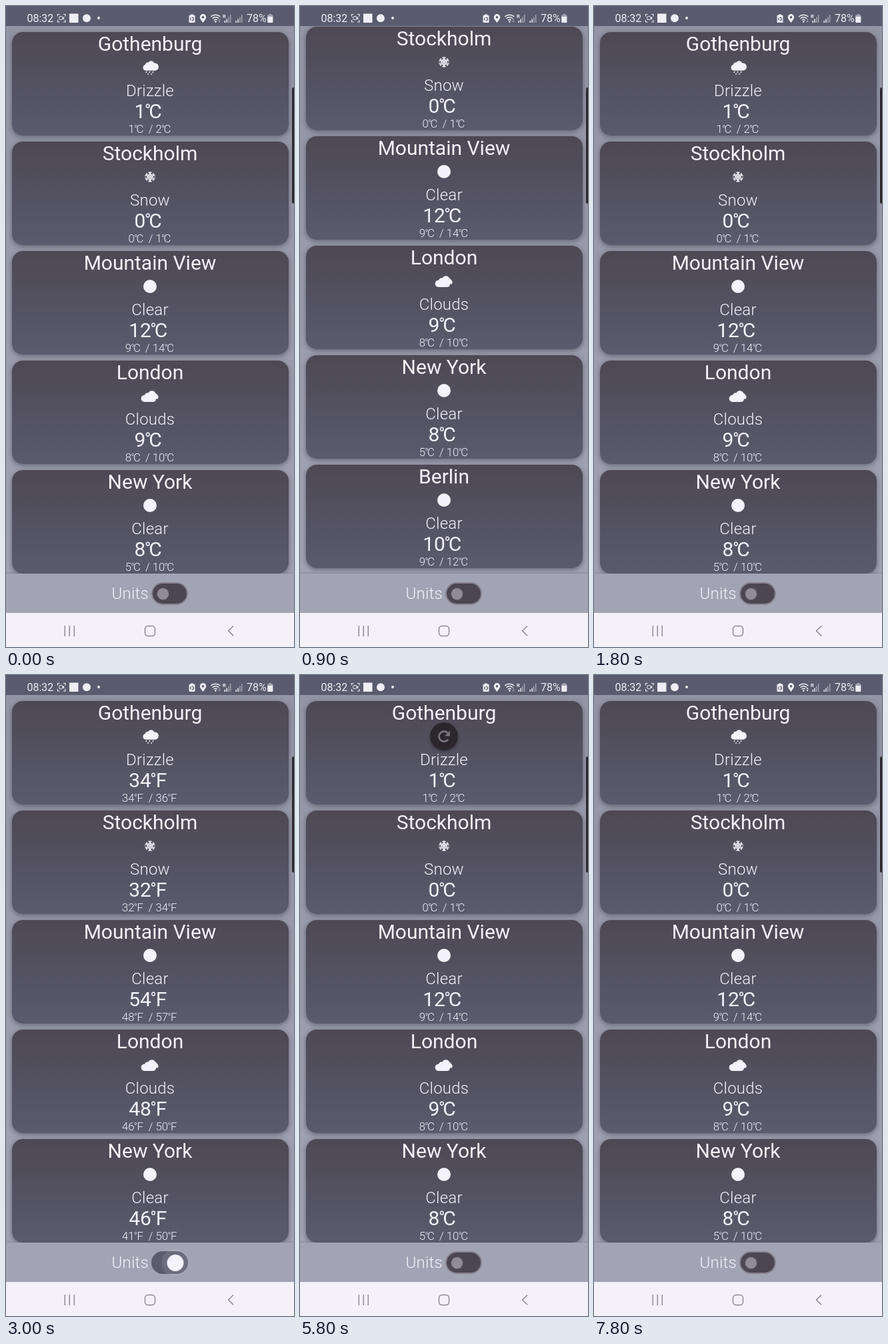
Write an HTML page that moves like this. It is 432 px wide and 960 px high and loops after 8300 ms.

```html
<!DOCTYPE html>
<html lang="en">
<head>
<meta charset="utf-8">
<title>Weather list</title>
<style>
  html, body { margin: 0; width: 100%; height: 100%; overflow: hidden; }
  body { font-family: Roboto, sans-serif; color: #f4f2fa; }
  #stage { position: relative; width: 432px; height: 960px; overflow: hidden; background: #5a5b6e; }
  #stage > * { position: absolute; }
  .view {
    left: 0; top: 30px; width: 432px; height: 820px; overflow: hidden;
    background: linear-gradient(#9395a4, #a1a3b2);
  }
  .stretch { height: 100%; }
  .list { padding-top: 8.5px; }
  .card {
    position: relative; display: grid; box-sizing: border-box;
    grid-template-rows: 35px 37px 32px 29px 25px;
    align-items: center; justify-items: center;
    width: 415px; height: 155.5px; margin: 0 auto 8.5px; border-radius: 16px;
    background: linear-gradient(#4d4854, #5a5b6d);
    box-shadow: 0 2px 7px rgba(45, 42, 58, .5);
    white-space: nowrap;
  }
  .card > * { grid-column: 1; }
  .city, .temp { font-size: 30px; }
  .label, .units { font-size: 24px; font-weight: 300; letter-spacing: .2px; }
  .temp { grid-row: 4; }
  .range { grid-row: 5; font-size: 16.8px; font-weight: 300; padding-left: 2px; }
  .f { opacity: 0; }
  .deg { position: relative; top: -.1em; font-size: .85em; margin: 0 -.124em 0 -.06em; }
  .f .deg { margin-right: -.048em; }
  .unit { margin-right: .186em; }
  .f .unit { margin-right: .22em; }
  .icon { width: 32px; height: 32px; fill: #f4f2fa; }

  .pull {
    position: absolute; left: 195px; top: 41px; width: 42px; height: 42px;
    border-radius: 50%; background: #2b272d; opacity: 0;
    box-shadow: 0 2px 4px rgba(30, 28, 36, .4);
  }
  .pull svg { position: absolute; inset: 0; fill: none; stroke: #7c7782; stroke-width: 2.6; }

  .bar {
    left: 0; top: 850px; width: 432px; height: 59px; background: #a2a4b3;
    box-shadow: 0 0 3px rgba(70, 68, 84, .45);
  }
  .units { position: absolute; left: 158.5px; top: 14px; line-height: 32px; }
  .track {
    position: absolute; left: 218px; top: 13px; width: 55px; height: 34px; box-sizing: border-box;
    border: 2px solid #87838f; border-radius: 17px; background: #4b4652;
  }
  .halo, .thumb { position: absolute; border-radius: 50%; }
  .halo { left: 215px; top: 10px; width: 40px; height: 40px; background: rgba(235, 230, 245, .12); opacity: 0; }
  .thumb { left: 222.5px; top: 17.5px; width: 25px; height: 25px; background: #918c98; transform: scale(.7); }
  .nav { left: 0; top: 909px; width: 432px; height: 51px; background: #f4f2f8; }
  .edge { right: 0; top: 122px; width: 3px; height: 174px; border-radius: 3px 0 0 3px; background: #2b272d; }
  .chrome { left: 0; top: 0; fill: #efedf5; font-size: 16px; }
</style>
</head>
<body>
<svg width="0" height="0" style="position:absolute">
  <symbol id="clear" viewBox="-16 -16 32 32"><circle r="10"/></symbol>
  <symbol id="clouds" viewBox="-16 -16 32 32">
    <path d="M-8.5 9A5 5 0 0 1-8-1.2A4.5 4.5 0 0 1-2.5-4.5A6 6 0 0 1 8.2-4.2A5 5 0 0 1 11-1.5A4 4 0 0 1 11.5 4.5H9A5 5 0 0 1 4 9Z"/>
  </symbol>
  <symbol id="drizzle" viewBox="-16 -16 32 32">
    <path d="M-6.5 4.8A4.6 4.6 0 0 1-7-4.2A4.2 4.2 0 0 1-2.5-7.5A5.2 5.2 0 0 1 6.5-6.5A4.8 4.8 0 0 1 8 4.8Z"/>
    <path d="M-5 6l-1 2M0 6l-1 2M5 6l-1 2M-2.5 9l-.8 1.8M2.5 9l-.8 1.8" stroke="#f4f2fa" stroke-width="1.5"/>
  </symbol>
  <symbol id="snow" viewBox="-16 -16 32 32">
    <g id="arm" fill="none" stroke="#f4f2fa" stroke-width="1.3">
      <path id="spoke" d="M0 0V-8M-2.6-7.4L0-4.8L2.6-7.4M-2-4.2L0-2.4L2-4.2"/>
      <use href="#spoke" transform="rotate(60)"/>
      <use href="#spoke" transform="rotate(120)"/>
      <use href="#spoke" transform="rotate(180)"/>
      <use href="#spoke" transform="rotate(240)"/>
      <use href="#spoke" transform="rotate(300)"/>
    </g>
  </symbol>
</svg>

<div id="stage">
  <div class="view">
    <div class="stretch"><div class="list"></div></div>
    <div class="pull">
      <svg class="arrow" viewBox="-21 -21 42 42">
        <path d="M6.2 4.5A7.6 7.6 0 1 1 5.6-5.2"/>
        <path d="M8.8-8.5V-.6H1Z" fill="#7c7782" stroke="none"/>
      </svg>
      <svg class="spin" viewBox="-21 -21 42 42"><path d="M0-7.6A7.6 7.6 0 1 1-7.6 0"/></svg>
    </div>
  </div>

  <div class="bar">
    <span class="units">Units</span>
    <div class="track"></div>
    <div class="halo"></div>
    <div class="thumb"></div>
  </div>
  <div class="nav"></div>
  <div class="edge"></div>

  <svg class="chrome" width="432" height="960">
    <text x="31.5" y="23.7">08:32</text>
    <path d="M77.5 15.5v-3h3M86 12.5h3v3M89 21v3h-3M80.500 24h-3v-3" fill="none" stroke="#efedf5" stroke-width="1.2"/>
    <g class="rec">
      <rect x="79.800" y="15.600" width="5" height="5" rx="1" fill="none" stroke="#efedf5"/>
      <path d="M85 17.500l2.200-1.500v4.500L85 19Z"/>
    </g>
    <rect x="95" y="11.500" width="13.500" height="13.500"/>
    <circle cx="121" cy="18.200" r="6"/>
    <circle cx="139" cy="18" r="2"/>

    <path d="M277 12.500h4v1.200h1.500a1 1 0 0 1 1 1V24a1 1 0 0 1-1 1h-7a1 1 0 0 1-1-1v-9.300a1 1 0 0 1 1-1H277Z"/>
    <circle cx="279" cy="19.500" r="2.300" fill="none" stroke="#5a5b6e" stroke-width="1.200" stroke-dasharray="3.600 1.200"/>
    <path fill-rule="evenodd" d="M295.500 25C292 20.500 290.800 18.500 290.800 16.700a4.700 4.700 0 0 1 9.400 0C300.200 18.500 299 20.500 295.500 25ZM295.500 15a1.800 1.800 0 1 0 .01 0Z"/>
    <g fill="none" stroke="#efedf5" stroke-width="1.400">
      <path d="M307.200 16a10.500 10.500 0 0 1 14.200 0M309.500 18.700a7 7 0 0 1 9.600 0M311.800 21.300a3.800 3.800 0 0 1 5 0"/>
    </g>
    <circle cx="314.300" cy="23.500" r="1.300"/>
    <path class="up" d="M318.500 21l1.600-2.600 1.600 2.600Z"/>
    <path class="down" d="M318.500 22.300h3.200l-1.600 2.500Z"/>
    <text x="325" y="18" font-size="7.500" font-weight="700">R</text>
    <g id="signal">
      <path d="M327.500 22h1.500v3h-1.500zM330.300 19.500h1.500V25h-1.500z"/>
      <path d="M333.100 16.500h1.500V25h-1.500zM335.900 13h1.500v12h-1.500z" opacity=".5"/>
    </g>
    <use href="#signal" x="17"/>
    <text x="361" y="23.700">78%</text>
    <path d="M394.500 12h3.600v1.300h1.300a1 1 0 0 1 1 1V16h-8.200v-1.700a1 1 0 0 1 1-1h1.300Z" opacity=".5"/>
    <path d="M392.200 16h8.200v8a1 1 0 0 1-1 1h-6.200a1 1 0 0 1-1-1Z"/>

    <g fill="none" stroke="#8d8a97" stroke-width="1.500">
      <path d="M88.300 928v16M95.300 928v16M102.300 928v16M341 928.500l-7.500 7.300 7.500 7.300"/>
      <rect x="208.500" y="928.500" width="15" height="15" rx="4.500"/>
    </g>
  </svg>
</div>

<script>
  const LOOP = 8300;
  const cities = [
    ['Gothenburg', 'Drizzle', 1, 1, 2],
    ['Stockholm', 'Snow', 0, 0, 1],
    ['Mountain View', 'Clear', 12, 9, 14],
    ['London', 'Clouds', 9, 8, 10],
    ['New York', 'Clear', 8, 5, 10],
    ['Berlin', 'Clear', 10, 9, 12]
  ];

  const degrees = (c, unit) => {
    const value = unit === 'F' ? Math.round(c * 1.8 + 32) : c;
    return `${value}<span class="deg">°</span><span class="unit">${unit}</span>`;
  };
  const readings = (unit, now, low, high) => `
    <div class="temp ${unit.toLowerCase()}">${degrees(now, unit)}</div>
    <div class="range ${unit.toLowerCase()}">${degrees(low, unit)} / ${degrees(high, unit)}</div>`;

  document.querySelector('.list').innerHTML = cities.map(([city, sky, ...temps]) => `
    <div class="card">
      <div class="city">${city}</div>
      <svg class="icon"><use href="#${sky.toLowerCase()}"/></svg>
      <div class="label">${sky}</div>
      ${readings('C', ...temps)}${readings('F', ...temps)}
    </div>`).join('');

  // Stepped loop: each [ms, value] holds until the next one.
  function play(selector, steps, style) {
    const frames = steps.map(([ms, ...v]) => ({
      offset: Math.max(0, ms - 4) / LOOP, easing: 'step-end', ...style(...v)
    }));
    for (const el of document.querySelectorAll(selector))
      el.animate(frames, { duration: LOOP, iterations: Infinity });
  }
  const opacity = v => ({ opacity: v });
  const rotate = a => ({ transform: `rotate(${a}deg)` });

  play('.list', [[0, 0], [500, 85], [600, 172], [1600, 167.5], [1700, 80], [1800, 0]],
    y => ({ transform: `translateY(${-y}px)` }));

  // Overscroll at either end
  play('.stretch', [
    [0, 0, 100], [700, .012, 100], [800, .005, 100], [900, 0, 100],
    [1900, .006, 0], [2000, .012, 0], [2100, .012, 0], [2200, .008, 0], [2300, .003, 0], [2400, 0, 0]
  ], (k, origin) => ({ transform: `scaleY(${1 + k})`, transformOrigin: `0 ${origin}%` }));

  const blink = [[0, 1]];
  for (let ms = 300, on = 0; ms < LOOP; ms += 500, on = 1 - on) blink.push([ms, on]);
  play('.rec', blink, opacity);
  play('.up', [[0, .4], [1300, 1], [1400, .4], [4400, 1], [4500, .4], [7600, 1]], opacity);
  play('.down', [[0, .6], [7600, 1]], opacity);

  // Units switch
  play('.c', [[0, 1], [2900, 0], [4400, 1]], opacity);
  play('.f', [[0, 0], [2900, 1], [4400, 0]], opacity);
  play('.track', [[0, '#4b4652', '#87838f'], [2900, '#5b5c6e', '#5b5c6e'], [4400, '#4b4652', '#87838f']],
    (backgroundColor, borderColor) => ({ backgroundColor, borderColor }));
  play('.thumb', [
    [0, 0, .7, '#918c98'], [2800, 0, 1, '#918c98'], [2900, 11, 1.05, '#f4f2fa'], [3000, 18.5, 1, '#f4f2fa'],
    [4300, 18.5, 1.1, '#f4f2fa'], [4400, 8, .9, '#918c98'], [4500, 0, .7, '#918c98']
  ], (x, k, backgroundColor) => ({ transform: `translateX(${x}px) scale(${k})`, backgroundColor }));
  play('.halo', [[0, 0, 0], [2800, 0, 1], [2900, 11, 1], [3000, 18.5, 1], [3100, 18.5, 0],
    [4300, 18.5, 1], [4400, 8, 1], [4500, 0, 1], [4600, 0, 0]],
    (x, o) => ({ transform: `translateX(${x}px)`, opacity: o }));

  // Pull to refresh
  play('.pull', [[0, -84, 0], [5600, -48, 1], [5700, -22, 1], [5800, 0, 1], [5900, 22, 1],
    [6000, 34, 1], [6100, 16, 1], [6200, 0, 1], [6500, 0, 0]],
    (y, o) => ({ transform: `translateY(${y}px)`, opacity: o }));
  play('.arrow', [[0, -90, 1], [5700, -45, 1], [5800, 0, 1], [5900, 45, 1], [6000, 70, 1], [6100, 70, 0]],
    (a, o) => ({ ...rotate(a), opacity: o }));
  play('.spin', [[0, 0, 0], [6100, 0, 1], [6200, 80, 1], [6300, 160, 1], [6400, 240, 1], [6500, 0, 0]],
    (a, o) => ({ ...rotate(a), opacity: o }));
</script>
</body>
</html>
```
